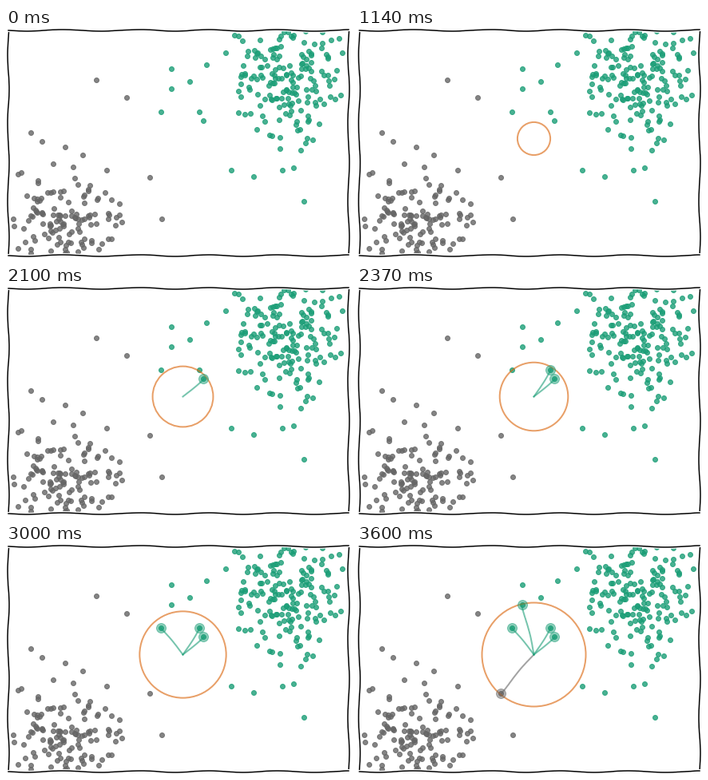
A matplotlib script for the animation above (5580 ms loop, 432 by 288 pixels).

```python
import numpy as np
import matplotlib.pyplot as plt
from matplotlib.animation import FuncAnimation
from matplotlib.patches import Circle
from matplotlib.patheffects import withStroke

W, H, DPI = 432, 288, 72
MARGIN = 3
INTERVAL, FRAMES, GROW_FRAMES = 30, 186, 120
CENTER, MAX_RADIUS = np.array([221.5, 138.5]), 65.0
GRAY, GREEN, ORANGE = "#666666", "#1b9e77", "#d95f02"
SKETCH = dict(scale=1, length=100, randomness=2)

rng = np.random.default_rng(4)


def blob(mean, std, count, stragglers):
    """Truncated normal cloud on the stage, plus a few far-off points."""
    offsets = rng.normal(size=(count * 4, 2))
    offsets = offsets[np.hypot(*offsets.T) < 2.3]
    points = np.array(mean) + offsets * std
    x, y = points.T
    visible = (x > 4) & (x < W - 4) & (y > 4) & (y < H - 4)
    clear = np.hypot(*(points - CENTER).T) > MAX_RADIUS + 8
    return np.vstack([stragglers, points[visible & clear][:count]])


gray_points = blob((68, 239), (36, 38), 122, [
    (179.8, 187), (112.8, 65), (151.2, 86.5), (30.5, 131),
    (44.8, 141.5), (73.8, 148.5), (194.7, 239.3),
])
green_points = blob((350, 60), (40, 43), 168, [
    (247.4, 116), (242.4, 104.8), (193.6, 105.3), (206.8, 75.6),
    (206.5, 50.5), (230.4, 66.5), (250.5, 46), (281.5, 178),
    (310.4, 185.5), (346, 177.5), (360, 174.5), (372.5, 216.5),
])

fig = plt.figure(figsize=(W / DPI, H / DPI), dpi=DPI, facecolor="white")
ax = fig.add_axes([MARGIN / W, MARGIN / H, 1 - 2 * MARGIN / W, 1 - 2 * MARGIN / H])
# Data units are stage pixels with y pointing down.
ax.set_xlim(MARGIN, W - MARGIN)
ax.set_ylim(H - MARGIN, MARGIN)
ax.set_xticks([])
ax.set_yticks([])
for spine in ax.spines.values():
    spine.set_linewidth(1.5)
    spine.set_sketch_params(**SKETCH)
    spine.set_path_effects([withStroke(linewidth=4, foreground="white")])

neighbours = []
for points, color in [(gray_points, GRAY), (green_points, GREEN)]:
    ax.scatter(*points.T, s=36, color=color, alpha=0.8, linewidths=1)
    distances = np.hypot(*(points - CENTER).T)
    for point, distance in zip(points, distances):
        if distance > MAX_RADIUS:
            continue
        link, = ax.plot(*zip(CENTER, point), color=color, lw=2, alpha=0.6)
        link.set_sketch_params(**SKETCH)
        halo = ax.scatter(*point, s=144, color=color, alpha=0.5,
                          linewidths=1, zorder=2.2)
        neighbours.append((distance, link, halo))

ring = Circle(CENTER, 0, fill=False, edgecolor=ORANGE, lw=2, alpha=0.6,
              zorder=2.1)
ax.add_patch(ring)


def update(frame):
    radius = MAX_RADIUS * min(frame / GROW_FRAMES, 1)
    ring.set_radius(radius)
    ring.set_visible(radius > 0)
    for distance, link, halo in neighbours:
        link.set_visible(distance <= radius)
        halo.set_visible(distance <= radius)
    return [ring]


anim = FuncAnimation(fig, update, frames=FRAMES, interval=INTERVAL,
                     repeat=True, repeat_delay=0, blit=False)
plt.show()
```
